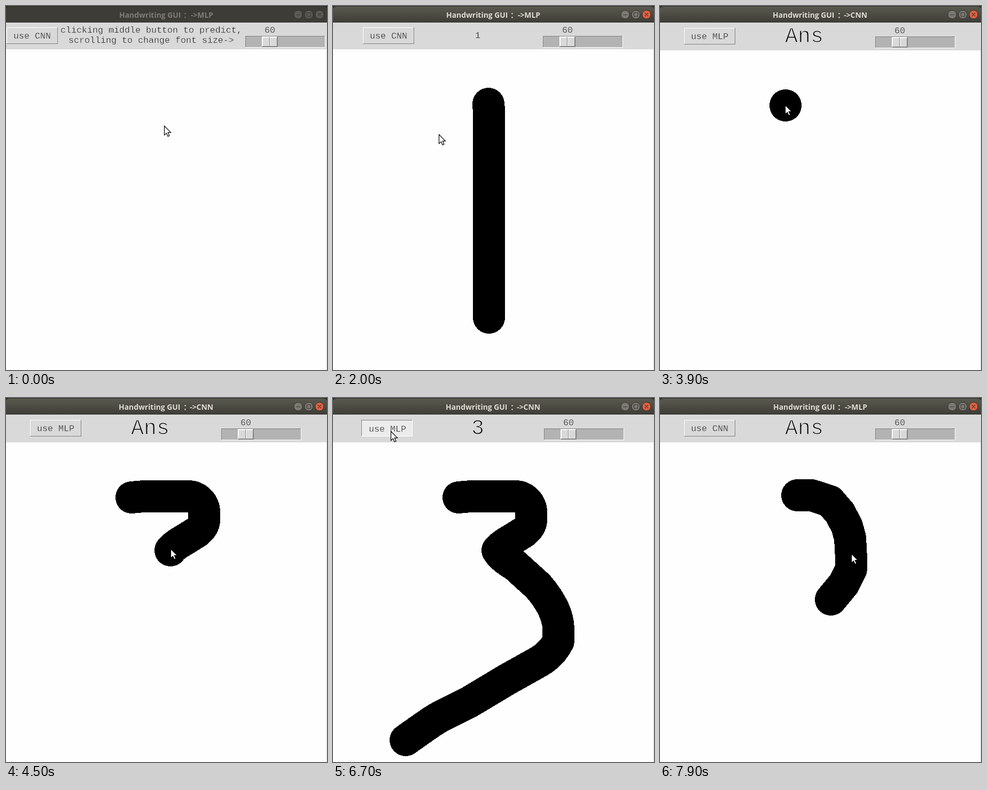
Write an HTML page that moves like this. It is 601x681 px and loops after 8000 ms.

```html
<!DOCTYPE html>
<html lang="en">
<head>
<meta charset="utf-8">
<title>Handwriting</title>
<style>
  html, body { margin: 0; width: 100%; height: 100%; overflow: hidden; background: #fefefe; }
  svg { display: block; width: 601px; height: 681px; }
  text { white-space: pre; }
  .mono { font: 16.667px "Liberation Mono", monospace; fill: #1c1c1c; stroke: #d9d9d9; stroke-width: .4px; }
  .mono.big { font-size: 40px; fill: #000; stroke-width: 1.5px; }
  .middle { text-anchor: middle; }
  .title { font: bold 13.9px "Open Sans", "Noto Sans CJK SC", "Noto Sans CJK", sans-serif; fill: #dfdbd2; }
  .bevels rect, #header { shape-rendering: crispEdges; }
  .light { fill: #fff; }
  .dark { fill: #828282; }
  .face { fill: #d9d9d9; }
  .trough { fill: #b3b3b3; }
  #strokes path { fill: none; stroke: #000; stroke-width: 60; stroke-linecap: round; stroke-linejoin: round; shape-rendering: crispEdges; }
  .round { fill: #7b7971; stroke: #33322e; }
  .round.close { fill: #e2603f; }
  .icon { fill: none; stroke: #3a3935; stroke-width: 1.2; }
  .unfocused .title { fill: #807d78; }
  .unfocused .round { fill: #5c5b55; }
  .hover .face { fill: #ececec; }
  .hover .mono { stroke: #ececec; }
  .pressed .light { fill: #828282; }
  .pressed .dark { fill: #fff; }
  .pressed .mono { transform: translate(1px, 1px); }
</style>
</head>
<body>
<svg viewBox="0 0 601 681">
  <defs>
    <linearGradient id="focusedBar" x2="0" y2="1">
      <stop stop-color="#5b5a50"/><stop offset="1" stop-color="#3d3c37"/>
    </linearGradient>
    <g id="thumbHalf">
      <rect class="dark" width="14" height="18"/>
      <rect class="light" width="13" height="17"/>
      <rect class="face" x="1" y="1" width="12" height="16"/>
    </g>
  </defs>
  <rect width="601" height="681" fill="#fefefe"/>
  <rect x="600" y="31" width="1" height="650" fill="#d9d9d9"/>
  <g id="strokes"></g>

  <g id="titleBar">
    <rect width="601" height="8" fill="#282724"/>
    <path id="bar" d="M0 31V7Q0 1 6 1H595Q601 1 601 7V31Z"/>
    <text class="title" id="titleStart" x="212" y="22">Handwriting GUI</text>
    <text class="title" x="332" y="22">：</text>
    <text class="title" id="titleMode" x="388" y="22" text-anchor="end"></text>
    <circle class="round" cx="547" cy="16" r="8"/>
    <circle class="round" cx="567" cy="16" r="8"/>
    <circle class="round close" cx="587" cy="16" r="8"/>
    <path class="icon" d="M543.5 16.5h7M563.5 12.5h7v7h-7zM584 13l6 6m0-6l-6 6"/>
  </g>

  <rect id="header" class="face" y="31" width="601"/>
  <g id="button" class="bevels">
    <rect class="dark" width="96" height="31"/>
    <rect class="light" width="95" height="30"/>
    <rect class="face" x="1" y="1" width="94" height="29"/>
    <text id="buttonText" class="mono middle" x="48" y="20.5"></text>
  </g>
  <g id="intro" class="mono">
    <text x="102" y="50">clicking middle button to predict,</text>
    <text x="117" y="69">scrolling to change font size-&gt;</text>
  </g>
  <text id="answer"></text>
  <g id="slider" class="bevels">
    <text class="mono middle" x="46" y="-6">60</text>
    <rect class="light" width="150" height="22"/>
    <rect class="dark" width="149" height="21"/>
    <rect class="trough" x="1" y="1" width="148" height="20"/>
    <rect class="dark" x="31" y="1" width="30" height="20"/>
    <rect class="light" x="31" y="1" width="29" height="19"/>
    <use href="#thumbHalf" x="32" y="2"/>
    <use href="#thumbHalf" x="46" y="2"/>
  </g>
  <path id="cursor" d="M0 0V17L4 13.4 6.6 19.4 9.4 18.2 6.8 12.2H12Z" fill="#fff" stroke="#000" stroke-width="1.2"/>
</svg>
<script>
const LOOP = 8000, STEP = 100;
const $ = id => document.getElementById(id);
const between = (t, start, end) => t >= start && t < end;

const layouts = [
  { from: 0, button: 1, slider: 448, drop: 0, answer: '' },
  { from: 1300, button: 56, slider: 393, drop: 0, answer: '1', x: 271, y: 60 },
  { from: 3500, button: 45, slider: 403, drop: 1, answer: 'Ans', x: 270, y: 68, big: true },
  { from: 5300, button: 53, slider: 395, drop: 1, answer: '3', x: 271, y: 68, big: true },
  { from: 7200, button: 45, slider: 403, drop: 1, answer: 'Ans', x: 270, y: 68, big: true }
];

const strokes = [
  { start: 600, end: 1100, clear: 3500, d: 'M291 183V188L292 192V583' },
  { start: 3900, end: 4500, clear: 7200,
    d: 'M235 186L258 184H341A30 30 0 0 1 371 214V228Q371 240 357 251L333 266Q312 278 308 285' },
  { start: 4500, end: 5000, clear: 7200,
    d: 'M308 285Q316 299 341 313L384 352Q422 396 422 433V455Q410 479 386 493L327 526 255 569 213 590Q197 597 173 614L136 640' },
  { start: 7600, end: 7900, clear: LOOP,
    d: 'M257 182H284L318 193 337 215 350 240 356 262 358 300V320L344 348 320 377' }
];

// time, x, y of the pointer tip
const pointer = [
  [0, 296, 224], [100, 296, 224], [200, 291, 202], [300, 291, 202], [400, 291, 167], [500, 291, 167],
  [600, 291, 183], [1100, 292, 583], [1400, 285, 440], [2000, 198, 240], [2300, 110, 58],
  [2500, 110, 58], [2900, 292, 272], [3400, 292, 272], [3800, 234, 185], [3900, 234, 185],
  [4250, 369, 208], [4500, 308, 282], [4750, 421, 440], [5000, 135, 638], [5200, 135, 638],
  [5600, 209, 198], [5900, 200, 167], [6300, 110, 64], [6700, 108, 62], [6900, 108, 62],
  [7500, 256, 182], [7700, 264, 182], [7800, 325, 205], [7900, 358, 291]
];

for (const stroke of strokes) {
  stroke.path = document.createElementNS('http://www.w3.org/2000/svg', 'path');
  stroke.path.setAttribute('d', stroke.d);
  $('strokes').append(stroke.path);
  stroke.length = stroke.path.getTotalLength();
}

function place(id, x, y) {
  $(id).setAttribute('transform', `translate(${x} ${y})`);
}

function pointerAt(t) {
  const next = pointer.findIndex(key => key[0] > t);
  if (next < 0) return pointer.at(-1).slice(1);
  const [t0, x0, y0] = pointer[next - 1], [t1, x1, y1] = pointer[next];
  const k = (t - t0) / (t1 - t0);
  return [x0 + (x1 - x0) * k, y0 + (y1 - y0) * k];
}

function drawStrokes(t) {
  for (const { path, start, end, clear, length } of strokes) {
    const progress = Math.min(1, (t - start) / (end - start));
    path.style.display = between(t, start, clear) ? '' : 'none';
    path.setAttribute('stroke-dasharray',
      progress < 1 ? `${Math.max(.01, progress * length)} ${length * 2}` : 'none');
  }
}

function drawHeader(t) {
  const layout = layouts.findLast(l => t >= l.from);
  const { drop, big, answer } = layout;
  $('header').setAttribute('height', 50 + 2 * drop);
  place('button', layout.button, 40 + drop);
  place('slider', layout.slider, 56 + drop);
  $('intro').style.display = answer ? 'none' : '';
  $('answer').textContent = answer;
  $('answer').setAttribute('class', big ? 'mono middle big' : 'mono middle');
  place('answer', layout.x || 0, layout.y || 0);
}

function drawControls(t) {
  const focused = t >= 600, cnn = between(t, 2500, 6800);
  $('titleBar').setAttribute('class', focused ? '' : 'unfocused');
  $('bar').setAttribute('fill', focused ? 'url(#focusedBar)' : '#3d3c37');
  $('titleStart').setAttribute('x', cnn ? 211 : 212);
  $('titleMode').textContent = cnn ? '->CNN' : '->MLP';
  $('buttonText').textContent = cnn ? 'use MLP' : 'use CNN';
  const hover = between(t, 2300, 2600) || between(t, 6300, 7000);
  const pressed = between(t, 2400, 2500) || between(t, 6700, 6800);
  $('button').setAttribute('class', `bevels${hover ? ' hover' : ''}${pressed ? ' pressed' : ''}`);
}

function frame(now) {
  const t = Math.floor(now % LOOP / STEP) * STEP;
  drawStrokes(t);
  drawHeader(t);
  drawControls(t);
  const [x, y] = pointerAt(t);
  place('cursor', Math.round(x) + .5, Math.round(y) + .5);
  requestAnimationFrame(frame);
}
requestAnimationFrame(frame);
</script>
</body>
</html>
```
